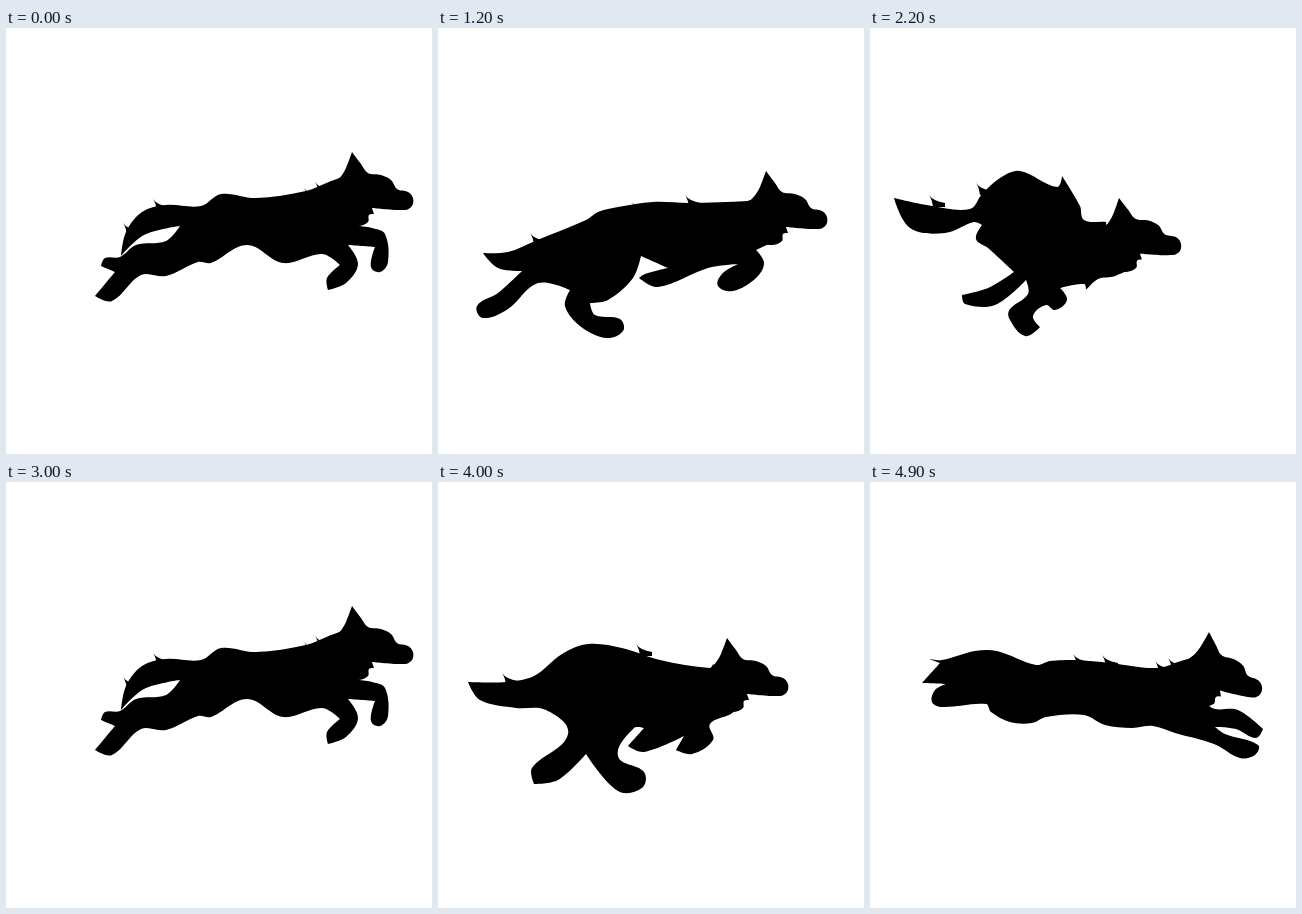
Animation, 426 px wide and 426 px high, one loop 5000 ms. Source, as an HTML page:

```html
<!DOCTYPE html>
<html lang="en">
<head>
<meta charset="utf-8">
<title>Running wolf</title>
<style>
html, body { margin: 0; width: 100%; height: 100%; overflow: hidden; background: #fff; }
svg { display: block; width: 100%; height: 100%; }
</style>
</head>
<body>
<svg viewBox="0 0 426 426">
<defs>
  <path id="head" data-outline="0,0 9,12 16,21 29,23 39,28 45,37 56,40 61,46 60,54 53,58 20,56 22,62 17,63 16,70 6,74 -30,70 -22,38 -10,23 -6,16"/>
  <path id="tuft" d="M0 0Q4 6 16 8V12H4Q3 4 0 0Z"/>
</defs>
<g class="pose" id="leap">
  <path data-outline="340,150 362,188 352,198 366,200 379,206 382,234 374,244 365,239 369,219 342,217 352,236 340,255 322,262 321,250 334,237 316,226 277,235 241,217 205,235 192,234 160,248 135,247 106,273 89,268 109,244 95,238 99,230 114,229 130,217 160,213 174,198 138,207 115,228 120,204 136,184 160,177 195,178 215,166 250,170 300,163 328,152"/>
  <use href="#head" transform="translate(346 124)"/>
  <use href="#tuft" x="147" y="171"/>
  <use href="#tuft" x="117" y="195"/>
  <use href="#tuft" x="298" y="160"/>
  <use href="#tuft" x="309" y="154"/>
</g>
<g class="pose" id="reach">
  <path data-outline="330,178 338,222 345,227 368,228 393,247 386,256 366,247 345,245 355,252 388,263 385,273 370,276 344,262 305,251 283,244 262,246 235,243 214,233 176,235 162,241 140,240 121,230 116,222 72,225 62,220 65,208 76,202 52,201 70,181 59,177 72,178 105,169 127,169 166,183 180,179 205,178 240,181 287,186 318,177"/>
  <use href="#head" transform="translate(339 150) rotate(9)"/>
  <use href="#tuft" x="203" y="172"/>
  <use href="#tuft" x="232" y="173"/>
  <use href="#tuft" x="285" y="179"/>
  <use href="#tuft" x="298" y="176"/>
</g>
<g class="pose" id="fore-landing">
  <path data-outline="300,165 308,212 297,218 322,235 362,243 364,252 350,262 328,261 292,248 275,246 290,272 302,283 320,285 322,293 300,300 288,287 272,276 238,240 216,237 192,217 179,200 160,216 131,218 115,230 97,234 87,229 107,218 103,204 82,214 53,224 48,213 65,199 80,179 102,163 112,158 145,151 185,154 207,161 206,149 228,169 262,167 292,166"/>
  <use href="#head" transform="translate(317 142) rotate(15)"/>
  <use href="#tuft" x="98" y="153"/>
  <use href="#tuft" x="261" y="164"/>
  <use href="#tuft" x="272" y="162"/>
</g>
<g class="pose" id="rump-up">
  <path data-outline="270,176 283,225 272,237 286,268 304,284 284,292 258,264 246,254 236,284 245,300 222,304 216,284 222,264 198,244 172,222 136,258 108,259 104,249 126,232 116,226 86,236 78,226 96,213 98,186 66,152 50,108 58,90 78,126 104,154 142,143 198,158 199,147 220,176 265,178"/>
  <use href="#head" transform="translate(282 154) rotate(7)"/>
  <use href="#tuft" x="247" y="174"/>
</g>
<g class="pose" id="gathered">
  <path data-outline="236,196 258,238 245,248 228,251 216,262 214,256 190,260 197,272 185,282 176,277 163,288 170,299 155,308 139,290 140,281 158,266 156,252 125,277 95,276 92,267 118,260 144,244 118,220 106,211 112,197 104,194 75,205 40,200 24,170 62,178 100,181 112,166 130,150 150,143 187,159 192,148 210,178 214,192 236,194"/>
  <use href="#head" transform="translate(249 170) rotate(-1)"/>
  <use href="#tuft" x="59" y="167"/>
  <use href="#tuft" x="106" y="155"/>
</g>
<g class="pose" id="hind-landing">
  <path data-outline="275,182 297,226 272,242 275,258 254,272 238,268 246,254 206,270 190,264 206,246 196,246 180,274 206,290 204,306 180,309 148,272 120,298 96,302 94,286 130,252 108,228 78,226 42,218 30,200 68,200 96,194 124,172 150,162 184,166 222,178 272,186"/>
  <use href="#head" transform="translate(289 156)"/>
  <use href="#tuft" x="64" y="191"/>
  <use href="#tuft" x="198" y="162"/>
</g>
<g class="pose" id="push-off">
  <path data-outline="312,172 335,214 318,222 326,235 318,250 295,263 280,258 284,246 300,236 270,240 220,259 201,250 207,246 230,240 203,228 195,250 170,272 152,275 157,287 182,291 185,303 168,310 142,298 127,278 132,262 100,255 70,281 45,290 39,278 60,265 84,243 60,240 45,225 70,224 97,213 148,192 160,184 180,179 215,174 252,175 310,173"/>
  <use href="#head" transform="translate(328 143)"/>
  <use href="#tuft" x="92" y="205"/>
  <use href="#tuft" x="194" y="174"/>
  <use href="#tuft" x="247" y="167"/>
</g>
</svg>
<script>
const parse = text => text.split(" ").map(p => p.split(",").map(Number));
const sub = (a, b) => [a[0] - b[0], a[1] - b[1]];

// Closed smooth curve through the points; turns over 90 degrees stay sharp.
function outline(points) {
  const n = points.length;
  const at = i => points[(i + n) % n];
  const tangent = i => {
    const a = sub(at(i), at(i - 1)), b = sub(at(i + 1), at(i));
    if (a[0] * b[0] + a[1] * b[1] < 0) return [0, 0];
    const d = sub(at(i + 1), at(i - 1)), len = Math.hypot(...d);
    return [d[0] / len, d[1] / len];
  };
  let d = "M" + at(0);
  for (let i = 0; i < n; i++) {
    const p = at(i), q = at(i + 1), u = tangent(i), v = tangent(i + 1);
    const k = Math.hypot(...sub(q, p)) / 3;
    d += `C${p[0] + u[0] * k},${p[1] + u[1] * k} ${q[0] - v[0] * k},${q[1] - v[1] * k} ${q}`;
  }
  return d + "Z";
}

document.querySelectorAll("[data-outline]").forEach(path =>
  path.setAttribute("d", outline(parse(path.dataset.outline))));
const poses = [...document.querySelectorAll(".pose")];

// Seven poses run at 12 per second, seen at 10 per second; the first is held twice as long.
function draw(ms) {
  const step = Math.max(0, Math.floor(ms % 5000 / 100) - 1);
  const current = Math.floor((6 * step + 1) / 5) % poses.length;
  poses.forEach((pose, i) => pose.style.display = i === current ? "" : "none");
}

const start = performance.now();
function tick() {
  draw(performance.now() - start);
  requestAnimationFrame(tick);
}
tick();
</script>
</body>
</html>
```
